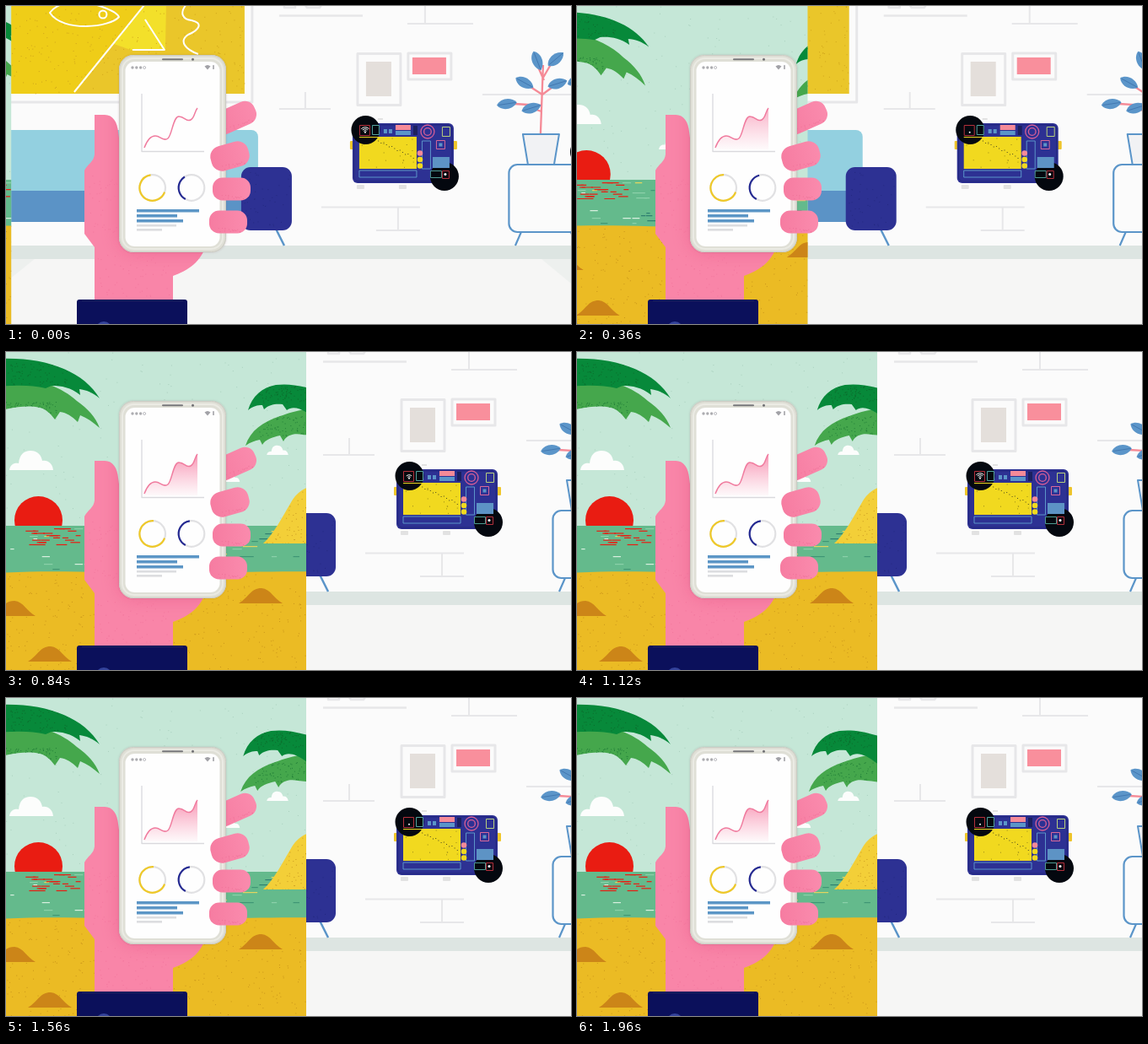
Animation of 670 by 377 pixels, one loop 2 s. Source, as an HTML page with a canvas:

```html
<!DOCTYPE html>
<html lang="en">
<head>
<meta charset="utf-8">
<title>Phone, beach and living room</title>
<style>
html, body { margin: 0; width: 100%; height: 100%; overflow: hidden; background: #fbfbfb; }
canvas { display: block; width: 670px; height: 377px; }
</style>
</head>
<body>
<canvas id="stage"></canvas>
<script>
const W = 670, H = 377, LOOP = 2000;
const canvas = document.getElementById('stage');
const dpr = window.devicePixelRatio || 1;
canvas.width = W * dpr;
canvas.height = H * dpr;
const c = canvas.getContext('2d');

const NAVY = '#2d3193', BLUE = '#5b95c9', SKYBLUE = '#93d0e0', PINK = '#f985a8';
const GREY = '#e7e7e9', YELLOW = '#f1d91f', RED = '#e91c12';
const DARK_LEAF = '#07893a', LIGHT_LEAF = '#45a74c';

const clamp = v => Math.max(0, Math.min(1, v));
const mix = (a, b, k) => a + (b - a) * k;

// Eased progress along cubic-bezier(.3, .1, .35, 1)
function ease(x) {
  if (x >= 1) return 1;
  const at = (s, a, b) => 3 * (1 - s) ** 2 * s * a + 3 * (1 - s) * s * s * b + s ** 3;
  let lo = 0, hi = 1;
  for (let i = 0; i < 24; i++) {
    const m = (lo + hi) / 2;
    if (at(m, .3, .35) < x) lo = m; else hi = m;
  }
  return at(lo, .1, 1);
}

function randomizer(seed) {
  return () => {
    seed = (seed * 1664525 + 1013904223) % 4294967296;
    return seed / 4294967296;
  };
}

function fill(d, color) {
  c.fillStyle = color;
  c.fill(new Path2D(d));
}
function line(d, color, w = 2) {
  c.strokeStyle = color;
  c.lineWidth = w;
  c.stroke(new Path2D(d));
}
function box(x, y, w, h, color, r = 0) {
  c.fillStyle = color;
  c.beginPath();
  c.roundRect(x, y, w, h, r);
  c.fill();
}
function frame(x, y, w, h, color, lw = 1, r = 0) {
  c.strokeStyle = color;
  c.lineWidth = lw;
  c.beginPath();
  c.roundRect(x, y, w, h, r);
  c.stroke();
}
function disc(x, y, r, color) {
  c.fillStyle = color;
  c.beginPath();
  c.arc(x, y, r, 0, 7);
  c.fill();
}
function arc(x, y, r, color, lw, from = 0, to = 360) {
  c.strokeStyle = color;
  c.lineWidth = lw;
  c.beginPath();
  c.arc(x, y, r, from * Math.PI / 180, to * Math.PI / 180);
  c.stroke();
}
function grain(x, y, w, h, count, color, seed, size = 1) {
  const rnd = randomizer(seed);
  c.fillStyle = color;
  for (let i = 0; i < count; i++) c.fillRect(x + rnd() * w, y + rnd() * h, size, size);
}
function at(x, y, angle, draw) {
  c.save();
  c.translate(x, y);
  c.rotate(angle);
  draw();
  c.restore();
}
function within(d, draw) {
  c.save();
  c.clip(new Path2D(d));
  draw();
  c.restore();
}

function painting() {
  frame(46, -20, 298, 134, GREY, 3);
  box(58, -10, 277, 114, '#eac62a');
  fill('M58 0H215L134 104H58Z', '#efcd18');
  fill('M215 0H242L241 52L200 52L180 45Z', '#f3e02a');
  grain(58, 0, 277, 104, 240, '#cfa51c', 5);
  line('M133 102L216 -1', '#fff', 2);
  line('M104 8C116 -8 150 -8 160 -1C176 4 184 8 186 13C176 25 120 32 104 8Z', '#fff', 2);
  arc(167, 10, 4.5, '#fff', 2);
  line('M217 16L240 52L202 52', '#fff', 2);
  line('M268 -4C256 8 262 16 272 17C286 20 282 28 268 34C256 42 266 52 280 57', '#fff', 2);
}

function plant() {
  line('M686 151L689 70M688 118L655 116M688 105L668 92M687 125L675 121M688 105L703 94M689 85L700 66M690 88L682 70', '#f58a96', 2.3);
  const leaves = [[682, 65, 1.2], [704, 63, -.7], [667, 91, .5], [646, 116, -.15], [675, 121, -.3], [706, 92, -.3], [729, 88, -.4]];
  for (const [x, y, a] of leaves) at(x, y, a, () => {
    fill('M-12 0C-7 -8 6 -8 12 0C6 8 -7 8 -12 0Z', BLUE);
    line('M-10 0H11', '#3f74ad', .8);
  });
  fill('M665 152H708L702 188H671Z', '#f1f2f4');
  line('M665 152H708L702 188H671Z', BLUE, 2);
  frame(648.5, 188, 88, 80, BLUE, 2.2, 10);
  line('M663 268L656 284M722 268L729 284', BLUE, 2.2);
}

function device(wifi) {
  box(460, 160, 6, 10, '#f0c62a', 1);
  box(581, 160, 6, 10, '#f0c62a', 1);
  box(468, 212, 9, 5, '#e2e2e2', 1);
  box(518, 212, 9, 5, '#e2e2e2', 1);
  box(493, 133, 6, 2, '#e2e2e2');
  box(463, 139, 120, 71, NAVY, 6);
  frame(465, 141, 116, 67, '#23277c', 1, 5);
  box(471, 155, 68, 38, YELLOW);
  grain(471, 155, 67, 37, 20, '#9a8a18', 8);
  c.fillStyle = '#4d4a20';
  for (let i = 0; i < 15; i++) c.fillRect(490 + i * 3.2, 157 + i * 1.5 + (i % 3), 1, 1);
  frame(471, 195, 68, 8, BLUE);
  box(500, 146, 4, 5, BLUE);
  box(506, 146, 4, 5, BLUE);
  box(514, 141, 18, 6, '#f58a98');
  box(514, 148, 18, 5, BLUE);
  box(535, 142, 5, 11, '#1c205f');
  arc(552, 149, 8, '#d55e97', 1.3);
  arc(552, 149, 4.3, '#d55e97', 1.3);
  frame(569.5, 143.5, 9, 11, '#b7cf7c', 1);
  frame(562.5, 159.5, 10, 10, '#d8699a', 1);
  box(565.5, 162.5, 4, 4, BLUE);
  frame(545.5, 160, 10, 33, BLUE);
  disc(543, 174.5, 3.3, '#f58a98');
  disc(543, 182, 3.3, YELLOW);
  disc(543, 189.5, 3.3, YELLOW);

  disc(478.5, 147, 17, '#04080f');
  frame(471.5, 141.5, 12, 12, '#b4313c');
  frame(486.5, 141.5, 8, 11, '#55a5a0');
  line('M471 155.5H494', YELLOW, 1);
  disc(478, 149.8, 1, '#fff');
  for (let i = 1; i < wifi; i++) arc(478, 150, i * 2 + .3, '#fff', 1, 222, 318);
  disc(572, 202, 17, '#04080f');
  box(558, 179, 20, 13, '#5d93c5');
  frame(555.5, 195.5, 13, 8, '#4e9a91');
  frame(569.5, 195.5, 8, 9, '#b4313c');
  disc(573, 199.5, 1.5, '#fff');
}

function room(t, shift) {
  box(0, 0, W, H, '#fbfbfb');
  box(0, 284, W, 16, '#dde5e2');
  box(0, 300, W, 77, '#edf0ee');
  c.save();
  c.translate(shift, 0);
  fill('M86 300H687L780 377H-10Z', '#f6f6f5');
  line('M376 11.5H475M382 -4V2H395V-4M405 -4L409 2H424L428 -4', GREY, 2.5);
  line('M549 0V21M528 21H606', GREY, 2);
  line('M376 122H437M407 102V122M426 238.500H543M491 266H543M517 238.500V266M617 105H722', GREY, 2);
  painting();
  frame(469, 56.5, 51, 61, GREY, 3);
  box(479, 66, 30, 41, '#e4dfdb');
  frame(529, 56, 51, 31, GREY, 3);
  box(534, 61, 40, 20, '#f98f9c');
  box(30, 147, 321, 109, SKYBLUE, 8);
  fill('M30 219H351V248Q351 256 343 256H30Z', '#5b93c6');
  line('M372 264L382 284', BLUE, 2.5);
  box(331, 191, 60, 75, NAVY, 11);
  grain(334, 195, 54, 68, 45, '#252a80', 23);
  plant();
  disc(738, 173, 17, '#04080f');
  const wifiSteps = [[0, 4], [120, 1], [440, 2], [720, 3], [1000, 4], [1280, 1]];
  device(wifiSteps.filter(s => s[0] <= t).pop()[1]);
  c.restore();
}

function cloud(x, base, w) {
  at(x, base, 0, () => {
    c.scale(w / 53, w / 53);
    fill('M-26 0C-25 -7 -20 -9 -15 -8C-14 -18 -9 -23 -1 -23C8 -23 12 -17 13 -11C20 -12 25 -8 26 0Z', '#fcfdfc');
  });
}

function hump(x, base) {
  fill(`M${x - 26} ${base}C${x - 13} ${base - 8} ${x - 12} ${base - 18} ${x + 1} ${base - 18}C${x + 12} ${base - 17} ${x + 15} ${base - 6} ${x + 26} ${base}Z`, '#cc8518');
}

function sea() {
  box(-10, 206, 480, 56, '#64ba8c');
  const rnd = randomizer(41);
  const tones = ['#3f9675', '#2f7f70', '#d8efdf', '#e3d55f', '#8bd0a9'];
  for (let i = 0; i < 70; i++) {
    const y = 209 + Math.floor(rnd() * 17) * 3;
    box(rnd() * 430 - 10, y, 4 + rnd() * 17, 1.2, tones[Math.floor(rnd() * 5)]);
  }
  for (let i = 0; i < 24; i++) {
    const y = 209 + (i % 8) * 2.7;
    box(22 + rnd() * 62, y, 4 + rnd() * 10, 1.2, RED);
  }
}

function frond(d, color, x, y, w, h, speck, seed) {
  fill(d, color);
  within(d, () => grain(x, y, w, h, 80, speck, seed));
}

function beach(t, shift) {
  const sway = clamp(1 - t / 840) * .1;
  box(0, 0, 360, H, '#c5e7d7');
  c.save();
  c.translate(shift, 0);
  grain(0, 0, 360, 205, 150, '#a9cfbd', 12);
  cloud(30, 140, 53);
  cloud(322, 122, 26);
  cloud(265, 154, 25);
  cloud(176, 101, 26);
  cloud(142, 170, 36);
  disc(38.5, 199.5, 28.5, RED);
  sea();
  const hill = 'M305 227C318 215 328 195 337 180C343 169 350 163 362 159L460 227Z';
  fill(hill, '#f3cf38');
  within(hill, () => grain(305, 160, 60, 67, 90, '#c99a23', 7));
  fill('M-10 262C60 258 110 262 180 262S310 259 460 261V377H-10Z', '#ebbb24');
  grain(0, 263, 440, 114, 420, '#c9951b', 3);
  hump(302, 298);
  hump(9, 313);
  hump(52, 367);

  at(0, 25, sway * .7, () => frond(
    'M-10 9C28 3 62 13 84 33C97 42 106 52 111 65C103 58 96 53 88 50L85 58C78 51 72 47 64 46L58 55C52 47 46 42 40 41C26 38 12 40 -10 45Z',
    LIGHT_LEAF, 0, 34, 60, 14, '#227f39', 9));
  at(0, 25, -sway, () => frond(
    'M-10 -17C45 -20 92 -3 111 30C103 23 95 20 87 19L88 26C77 17 66 15 54 15L47 18C30 14 14 14 -10 16Z',
    DARK_LEAF, 2, -12, 70, 26, '#0d6a2c', 10));

  const drift = -9 * clamp((t - 840) / 1120);
  at(drift, 0, 0, () => {
    frond('M420 64C370 62 344 69 325 76C304 83 290 93 284 111C290 107 295 105 301 104L304 110C307 104 316 101 325 99L329 106C333 98 342 96 352 98C365 99 380 102 420 110Z',
      LIGHT_LEAF, 300, 75, 60, 25, '#227f39', 17);
    frond('M420 66C370 44 344 36 320 39C304 42 292 52 287 69C293 64 298 63 304 63L306 68C312 62 320 61 328 62L333 69C340 63 352 67 364 77L420 100Z',
      DARK_LEAF, 300, 40, 58, 20, '#0d6a2c', 14);
  });
  c.restore();
}

const PALM = 'M105 129H117C127 129 132 138 133 149L150 280H238C233 303 215 314 198 320V350H105V286L93 270V195C97 187 104 185 105 176Z';

function hand() {
  fill(PALM, PINK);
  within(PALM, () => {
    c.shadowColor = 'rgba(228,80,128,.5)';
    c.shadowBlur = 22 * dpr;
    box(134, 58, 127, 234, PINK, 17);
  });
  grain(97, 200, 36, 70, 40, '#f2769d', 6);
  grain(107, 290, 90, 55, 60, '#f2769d', 16);
  finger(271, 132.5, 53, 28, -.42);
}

function finger(x, y, w, h, angle) {
  at(x, y, angle, () => {
    const g = c.createLinearGradient(-w / 2, 0, w / 2, 0);
    g.addColorStop(0, '#f67ca1');
    g.addColorStop(1, '#fa8bad');
    box(-w / 2, -h / 2, w, h, g, h * .43);
    grain(-w / 2 + 8, h / 2 - 7, w - 16, 5, 16, '#ef7299', 20);
  });
}

function chart(t) {
  const curve = 'M164 168C167 160 171 154 177 154S187 161 192 157S198 131 205 131S214 138 219 135S223 126 227 121';
  const g = c.createLinearGradient(0, 122, 0, 171);
  g.addColorStop(0, '#f897b5');
  g.addColorStop(1, 'rgba(250,175,198,.05)');
  c.globalAlpha = clamp((t - 50) / 420);
  fill(curve + 'V170H164Z', g);
  c.globalAlpha = 1;
  line('M161 104V172.500H235', '#d9d9dd', 1.3);
  line(curve, '#f07c9f', 1.5);
}

function phone(t) {
  c.save();
  c.shadowColor = 'rgba(90,40,60,.2)';
  c.shadowBlur = 3 * dpr;
  box(134, 58, 127, 234, '#dfdfd6', 17);
  c.restore();
  frame(134.5, 58.5, 126, 233, '#cbcbc3', 1, 17);
  frame(138, 62, 119, 226, '#ebebe4', 2, 14);
  box(141.5, 66, 112, 219, '#fefefe', 11);
  box(185, 62.3, 25, 2, '#77777a', 1);
  disc(221.5, 63.3, 1.5, '#6f6f72');

  for (let i = 0; i < 3; i++) disc(150 + i * 4.8, 73, 1.7, '#adadb1');
  arc(164.2, 73, 1.5, '#adadb1', .8);
  fill('M235.500 71.500Q239 68.500 242.500 71.500L239 75.500Z', '#a2a2a7');
  box(245, 70, 2, 5, '#b4b4b8', .6);

  chart(t);
  const grow = clamp(t / 500);
  arc(173.7, 215.5, 15.3, '#e1e1e3', 2.2);
  arc(173.7, 215.5, 15.3, '#efc928', 2.2, 20, mix(262, 275, grow));
  arc(220, 215.5, 15.3, '#e1e1e3', 2.2);
  arc(220, 215.5, 15.3, '#252a92', 2.2, 118, mix(238, 262, grow));
  for (const [y, w] of [[241, 74], [247, 48], [253, 55]]) box(155, y, w, 3.6, '#5c96c6');
  for (const [y, w] of [[259, 47], [264, 30]]) box(155, y, w, 2.6, '#dcdde0');
}

function sleeve() {
  box(84, 348, 131, 40, '#0b105b', 3);
  line('M90 349.5H210', '#20265f', 1);
  disc(116, 384, 10, '#34439b');
}

function draw(t) {
  const rest = 1 - ease((t + 27) / 742);
  const split = 356 * (1 - rest);
  c.setTransform(dpr, 0, 0, dpr, 0, 0);
  c.lineJoin = 'round';
  room(t, -53 * rest);
  within(`M0 0H${split}V377H0Z`, () => beach(t, -84 * rest ** .77));
  hand();
  phone(t);
  finger(265.5, 178, 46, 30, -.27);
  finger(267.5, 217, 45, 27, 0);
  finger(263.5, 256, 45, 27, 0);
  sleeve();
}

function tick() {
  draw(performance.now() % LOOP);
  requestAnimationFrame(tick);
}
tick();
</script>
</body>
</html>
```
